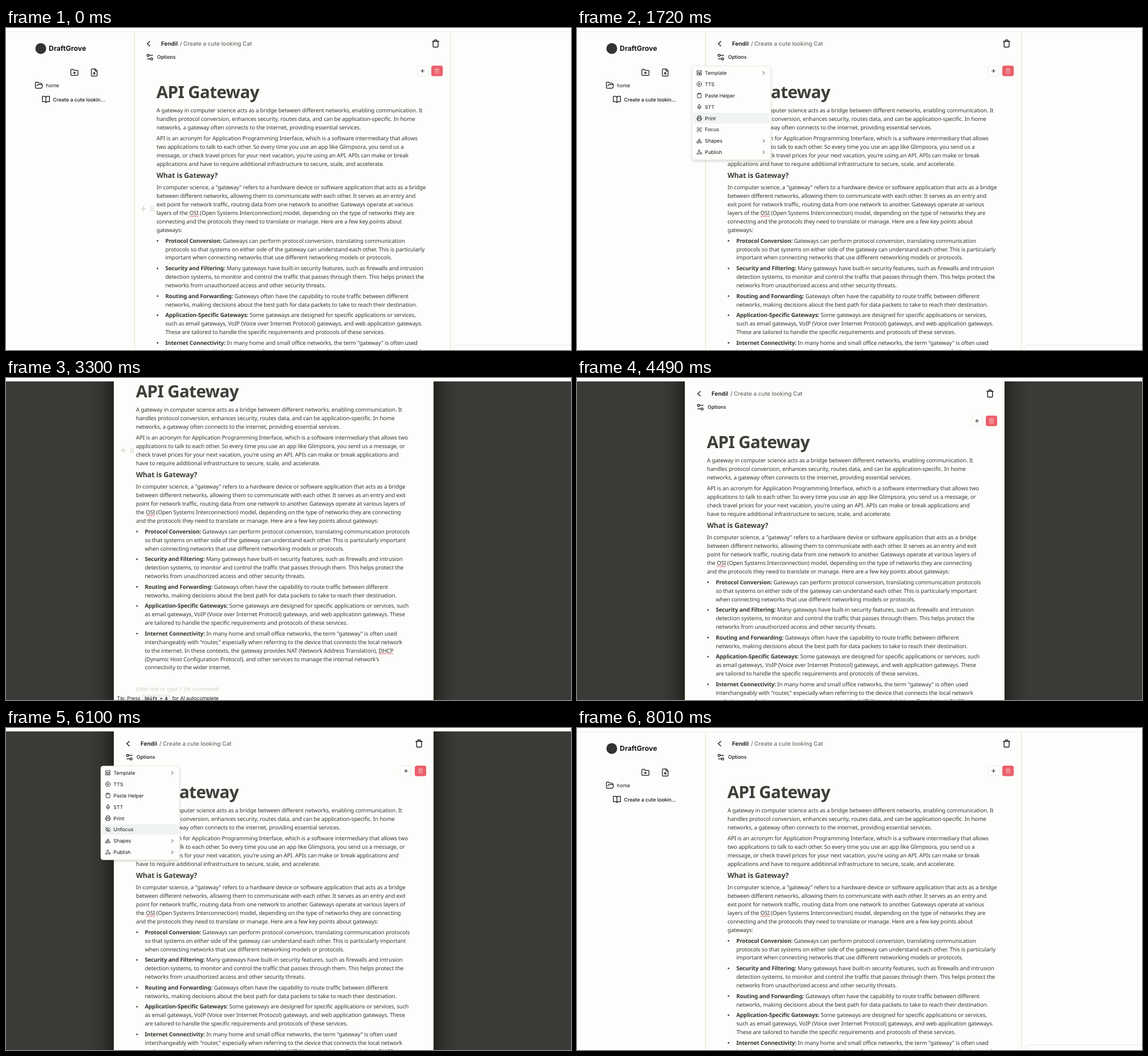
Write an HTML page that moves like this. It is 991 by 565 pixels and loops after 8370 ms.

```html
<!DOCTYPE html>
<html lang="en">
<head>
<meta charset="utf-8">
<title>Focus mode</title>
<style>
  html, body { margin: 0; width: 100%; height: 100%; overflow: hidden; background: #fdfdfb; }
  svg { display: block; }
  text { text-rendering: geometricPrecision; white-space: pre; }
  .ui { font: 400 8.75px Inter, sans-serif; fill: #151515; }
  .crumb { font: 500 10px Inter, sans-serif; fill: #6d6c69; }
  .body { font: 400 9.8px "Noto Sans", "Open Sans", sans-serif; letter-spacing: -.12px; fill: #363532; }
  .h1 { font: 700 29.6px "Noto Sans", "Open Sans", sans-serif; letter-spacing: -.65px; fill: #3f3e3b; }
  .h3 { font: 700 12.4px "Noto Sans", "Open Sans", sans-serif; letter-spacing: -.14px; fill: #3f3e3b; }
  .hint { font-style: italic; fill: #cfcfcb; }
  .key { font: 700 7.5px "DejaVu Sans Mono", monospace; fill: #222; }
</style>
</head>
<body>
<svg id="stage" width="991" height="565" viewBox="0 0 991 565">
  <defs>
    <clipPath id="below"><rect y="6" width="991" height="559"/></clipPath>
    <linearGradient id="shade">
      <stop offset="0" stop-color="#1d1d1a" stop-opacity="0"/>
      <stop offset=".55" stop-color="#1d1d1a" stop-opacity=".3"/>
      <stop offset="1" stop-color="#1d1d1a" stop-opacity=".85"/>
    </linearGradient>
    <filter id="soft" x="-10%" y="-10%" width="120%" height="125%">
      <feDropShadow dx="0" dy="2" stdDeviation="2" flood-opacity=".16"/>
    </filter>
  </defs>
</svg>
<script>
const LOOP = 8370, PAPER = '#fdfdfb', INK = '#151515', EDGE = '#e1e3c4';
const STEP = 14.9, GAP = 18.7;

const ICONS = {
  trash: 'M3 6h18M19 6v14c0 1-1 2-2 2H7c-1 0-2-1-2-2V6M8 6V4c0-1 1-2 2-2h4c1 0 2 1 2 2v2',
  bars: 'M10 11v6M14 11v6',
  plus: 'M5 12h14M12 5v14',
  left: 'M16 5l-8 7 8 7',
  right: 'M9 18l6-6-6-6',
  options: 'M20 7h-9M14 17H5M20 17a3 3 0 1 1-6 0a3 3 0 1 1 6 0M10 7a3 3 0 1 1-6 0a3 3 0 1 1 6 0',
  folderPlus: 'M12 10v6M9 13h6M20 20a2 2 0 0 0 2-2V8a2 2 0 0 0-2-2h-7.9a2 2 0 0 1-1.7-.9L9.6 3.9A2 2 0 0 0 7.9 3H4a2 2 0 0 0-2 2v13a2 2 0 0 0 2 2Z',
  fileUp: 'M15 2H6a2 2 0 0 0-2 2v16a2 2 0 0 0 2 2h12a2 2 0 0 0 2-2V7ZM14 2v4a2 2 0 0 0 2 2h4M12 12v6M15 15l-3-3-3 3',
  folder: 'M6 14l1.5-2.9A2 2 0 0 1 9.2 10H20a2 2 0 0 1 1.9 2.5l-1.5 6a2 2 0 0 1-2 1.5H4a2 2 0 0 1-2-2V5a2 2 0 0 1 2-2h3.9a2 2 0 0 1 1.7.9l.8 1.2a2 2 0 0 0 1.7.9H18a2 2 0 0 1 2 2v2',
  book: 'M2 3h6a4 4 0 0 1 4 4v14a3 3 0 0 0-3-3H2zM22 3h-6a4 4 0 0 0-4 4v14a3 3 0 0 1 3-3h7z',
  template: 'M3 3h18v7H3zM3 14h9v7H3zM16 14h5v7h-5z',
  play: 'M22 12a10 10 0 1 1-20 0a10 10 0 1 1 20 0M10 8l6 4-6 4z',
  paste: 'M8 2h8v4H8zM16 4h2a2 2 0 0 1 2 2v14a2 2 0 0 1-2 2H6a2 2 0 0 1-2-2V6a2 2 0 0 1 2-2h2',
  mic: 'M12 2a3 3 0 0 0-3 3v7a3 3 0 0 0 6 0V5a3 3 0 0 0-3-3ZM19 10v2a7 7 0 0 1-14 0v-2M12 19v3',
  print: 'M6 9V2h12v7M6 18H4a2 2 0 0 1-2-2v-5a2 2 0 0 1 2-2h16a2 2 0 0 1 2 2v5a2 2 0 0 1-2 2h-2M6 14h12v8H6z',
  focus: 'M3 7V5a2 2 0 0 1 2-2h2M17 3h2a2 2 0 0 1 2 2v2M21 17v2a2 2 0 0 1-2 2h-2M7 21H5a2 2 0 0 1-2-2v-2M5 12s2.5-5 7-5 7 5 7 5-2.5 5-7 5-7-5-7-5M13 12a1 1 0 1 1-2 0a1 1 0 1 1 2 0',
  unfocus: 'M2 2l20 20M9.9 5A10 10 0 0 1 12 5c7 0 10 7 10 7a13 13 0 0 1-1.7 2.7M6.6 6.6A13.5 13.5 0 0 0 2 12s3 7 10 7a9.7 9.7 0 0 0 5.4-1.6M9.9 9.9a3 3 0 1 0 4.2 4.2',
  shapes: 'M8 10l4-7 4 7ZM3 14h7v7H3zM21 17.5a3.5 3.5 0 1 1-7 0a3.5 3.5 0 1 1 7 0',
  publish: 'M18 17h-6c-1.1 0-2 .9-2.5 1.9A4 4 0 0 1 2 17c0-.7.2-1.4.6-2M6 17l3.1-5.8c.5-1 .1-2.2-.5-3.1a4 4 0 1 1 6.9-4M12 6l3.1 5.7C15.7 12.7 16.9 13 18 13a4 4 0 0 1 0 8'
};

// Line breaks: | in both layouts, ^ only beside the sidebar, ~ only in focus mode.
const INTRO = [
  'A gateway in computer science acts as a bridge between different networks, enabling communication. It|handles protocol conversion, enhances security, routes data, and can be application-specific. In home|networks, a gateway often connects to the internet, providing essential services.',
  "API is an acronym for Application Programming Interface, which is a software intermediary that allows^two~applications to talk to each other. So every time you use an app like Glimpsora, you send us a^message, or~check travel prices for your next vacation, you're using an API. APIs can make or break^applications and~have to require additional infrastructure to secure, scale, and accelerate."
];
const ABOUT = 'In computer science, a "gateway" refers to a hardware device or software application that acts as a bridge|between different networks, allowing them to communicate with each other. It serves as an entry and^exit~point for network traffic, routing data from one network to another. Gateways operate at various^layers of~the OSI (Open Systems Interconnection) model, depending on the type of networks they are^connecting~and the protocols they need to translate or manage. Here are a few key points about^gateways:';
const POINTS = [
  ['Protocol Conversion:', 'Gateways can perform protocol conversion, translating communication^protocols~so that systems on either side of the gateway can understand each other. This is particularly^important~when connecting networks that use different networking models or protocols.'],
  ['Security and Filtering:', 'Many gateways have built-in security features, such as firewalls and intrusion|detection systems, to monitor and control the traffic that passes through them. This helps protect the|networks from unauthorized access and other security threats.'],
  ['Routing and Forwarding:', 'Gateways often have the capability to route traffic between different|networks, making decisions about the best path for data packets to take to reach their destination.'],
  ['Application-Specific Gateways:', 'Some gateways are designed for specific applications or services,^such~as email gateways, VoIP (Voice over Internet Protocol) gateways, and web application gateways.^These~are tailored to handle the specific requirements and protocols of these services.'],
  ['Internet Connectivity:', 'In many home and small office networks, the term "gateway" is often used|interchangeably with "router," especially when referring to the device that connects the local network|to the internet. In these contexts, the gateway provides NAT (Network Address Translation), DHCP|(Dynamic Host Configuration Protocol), and other services to manage the internal network\'s|connectivity to the wider internet.']
];
const MISSPELT = /\b(OSI|DHCP)\b/;

const stage = document.getElementById('stage');

function add(parent, tag, attrs = {}, content) {
  const el = document.createElementNS('http://www.w3.org/2000/svg', tag);
  for (const k in attrs) el.setAttribute(k, attrs[k]);
  if (content) el.textContent = content;
  return parent.appendChild(el);
}
const group = (parent, attrs) => add(parent, 'g', attrs);
const rect = (parent, x, y, width, height, fill, more) => add(parent, 'rect', { x, y, width, height, fill, ...more });
const label = (parent, cls, x, y, str, style = '') => add(parent, 'text', { class: cls, x, y, style }, str);

function icon(parent, path, cx, cy, size = 15, stroke = INK, weight = 2) {
  const s = size / 24;
  return add(parent, 'path', {
    d: path, fill: 'none', stroke, 'stroke-width': weight, 'stroke-linecap': 'round', 'stroke-linejoin': 'round',
    transform: `translate(${cx - size / 2} ${cy - size / 2}) scale(${s})`
  });
}

// Zigzag under a misspelt word, placed from the laid-out text.
function squiggle(parent, text, y) {
  const hit = text.textContent.match(MISSPELT);
  if (!hit) return;
  const x0 = text.getStartPositionOfChar(hit.index).x;
  const x1 = text.getEndPositionOfChar(hit.index + hit[0].length - 1).x;
  let d = `M${x0} ${y}`;
  for (let x = x0 + 2, up = true; x <= x1; x += 2, up = !up) d += `L${x} ${up ? y + 2 : y}`;
  add(parent, 'path', { d, fill: 'none', stroke: '#d8434a', 'stroke-width': .9 });
}

function drawSidebar(parent) {
  add(parent, 'circle', { cx: 61, cy: 36, r: 9.5, fill: '#333331' });
  label(parent, 'ui', 75, 40.3, 'DraftGrove', 'font-size:12.3px;font-weight:700');
  icon(parent, ICONS.folderPlus, 120, 78);
  icon(parent, ICONS.fileUp, 154.7, 78);
  icon(parent, ICONS.folder, 57.8, 100.5);
  label(parent, 'ui', 70, 103.7, 'home');
  icon(parent, ICONS.book, 70, 125.5);
  label(parent, 'ui', 82.5, 128.6, 'Create a cute lookin...', 'font-weight:500');
  rect(parent, 784.5, 556.5, 220, 30, 'none', { rx: 5, stroke: '#e6e8ef' });
}

function drawColumn(parent, x0, x1) {
  rect(parent, x0, 7, x1 - x0, 558, PAPER);
  rect(parent, x0, 6, 1, 559, EDGE);
  rect(parent, x1 - 1, 6, 1, 559, EDGE);
}

function drawHeader(parent, x, right) {
  icon(parent, ICONS.left, x - 14, 27.5, 14, INK, 2.2);
  label(parent, 'crumb', x + 8, 30.9, 'Fendil', 'font-weight:600;fill:#151515');
  label(parent, 'crumb', x + 41, 30.9, '/');
  label(parent, 'crumb', x + 47, 30.9, 'Create a cute looking Cat');
  icon(parent, ICONS.options, x - 11.7, 51);
  label(parent, 'ui', x + 1, 54, 'Options', 'font-weight:500');
  icon(parent, ICONS.trash, right, 27.3, 15, INK, 2.2);
  rect(parent, right - 32.7, 66.5, 19.5, 17.5, '#fefefd', { rx: 3.5, stroke: '#ebebe8' });
  icon(parent, ICONS.plus, right - 23, 75.3, 10, INK, 2.2);
  rect(parent, right - 7.5, 66, 20, 18.5, '#ea606b', { rx: 3.5 });
  icon(parent, ICONS.trash + ICONS.bars, right + 2.6, 75.2, 10, '#f8c9cc', 2);
}

function drawPage(parent, x, right, focused) {
  const split = s => s.replace(focused ? /\^/g : /~/g, ' ').split(/[|^~]/);
  let y = 145;
  const paragraph = (str, left, bold) => {
    split(str).forEach((line, i) => {
      const t = add(parent, 'text', { class: 'body', x: left, y: y + 3.4 });
      if (bold && !i) {
        add(t, 'tspan', { 'font-weight': 700 }, bold);
        line = ' ' + line;
      }
      add(t, 'tspan', {}, line);
      squiggle(parent, t, y + 4.6);
      y += STEP;
    });
    y += GAP - STEP;
  };

  drawHeader(parent, x, right);
  label(parent, 'h1', x - .3, 122.6, 'API Gateway');
  INTRO.forEach(p => paragraph(p, x));
  label(parent, 'h3', x, 263.3, 'What is Gateway?');
  y = 280;
  paragraph(ABOUT, x);
  for (const [title, str] of POINTS) {
    add(parent, 'circle', { cx: x + 1.8, cy: y + .2, r: 1.4, fill: '#3f3e3b' });
    paragraph(str, x + 15.4, title);
  }
  if (!focused) return;
  label(parent, 'body hint', x, 638, "Enter text or type '/' for commands");
  label(parent, 'ui', 194.5, 654.3, 'Tip: Press');
  rect(parent, 238, 644, 51, 14, '#f0f0ed', { rx: 3 });
  label(parent, 'key', 243, 654.4, 'Shift + A');
  label(parent, 'ui', 291.5, 654.3, 'for AI autocomplete');
}

function drawHandle(parent, x) {
  const g = group(parent);
  add(g, 'path', { d: `M${x - 27.6} 0h9.4M${x - 22.9} -4.7v9.4`, stroke: '#c9c9c5', 'stroke-width': 1.2 });
  for (let i = 0; i < 6; i++)
    add(g, 'circle', { cx: x - 9.6 + (i % 2) * 3.7, cy: (Math.floor(i / 2) - 1) * 3.4, r: 1.05, fill: '#c4c4c0' });
  return g;
}

const ROW = 19.9, rowY = i => 78.7 + i * ROW;
function drawMenu(parent, toggle) {
  const g = group(parent);
  rect(g, 202, 66.8, 138, 164.4, PAPER, { rx: 4, stroke: '#e4e4e1', 'stroke-width': .8, filter: 'url(#soft)' });
  const mark = rect(g, 204.5, 0, 133, 18.6, '#eff4f2', { rx: 2.5 });
  ['Template', 'TTS', 'Paste Helper', 'STT', 'Print', toggle, 'Shapes', 'Publish'].forEach((name, i) => {
    const art = ['template', 'play', 'paste', 'mic', 'print', toggle.toLowerCase(), 'shapes', 'publish'][i];
    icon(g, ICONS[art], 214.5, rowY(i), 10);
    label(g, 'ui', 224.3, rowY(i) + 3.2, name);
    if (!i || i > 5) icon(g, ICONS.right, 327.5, rowY(i), 10);
  });
  return { g, mark };
}

const base = group(stage);
rect(base, 0, 0, 991, 565, PAPER);
rect(base, 0, 6, 991, 1, '#efefec');
drawSidebar(base);

const dark = group(stage);
rect(dark, 0, 6, 991, 559, '#3b3a37');
rect(dark, 148, 6, 42, 559, 'url(#shade)');
rect(dark, 0, 6, 42, 559, 'url(#shade)', { transform: 'translate(791 0) scale(-1 1)' });

const plain = group(stage);
drawColumn(plain, 225, 780);
drawPage(plain, 264, 753.5, false);
const plainHandle = drawHandle(plain, 264);

const zen = group(stage, { 'clip-path': 'url(#below)' });
rect(zen, 189, 6, 561, 1, PAPER);
drawColumn(zen, 189, 750);
const scroller = group(zen);
drawPage(scroller, 228, 724.5, true);
const zenHandle = drawHandle(scroller, 228.5);

rect(stage, 0, 0, 991, 6, '#fefefd');

const menus = [
  { ...drawMenu(stage, 'Focus'), dx: 0, open: 1150, close: 2100, hover: [[1330, 0], [1420, 1], [1520, 2], [1620, 3], [1700, 4], [1800, 5]] },
  { ...drawMenu(stage, 'Unfocus'), dx: -35.7, open: 4880, close: 6220, hover: [[5320, 0], [5420, 1], [5520, 2], [5630, 3], [5730, 4], [5850, 5]] }
];

// Centres of the blocks the drag handle can sit on.
const TITLE = 112, FIRST = 160, SECOND = 216, SUB = 259, MAIN = 317, NONE = null;
const HANDLE = [[0, MAIN], [520, SUB], [620, SECOND], [740, FIRST], [860, TITLE], [980, NONE],
  [2660, SECOND], [3660, FIRST], [3760, TITLE], [4260, NONE], [6600, FIRST], [6850, TITLE], [7050, NONE]];
const SCROLL = [[0, 0], [2870, 28], [2940, 66], [3000, 98], [3070, 107], [3300, 89], [3330, 38], [3370, 0]];
const FOCUS = [2100, 6220], FADE = 420;

const clamp = v => Math.min(1, Math.max(0, v));
const ease = v => 1 - (1 - clamp(v)) ** 2;
const at = (steps, t, none) => steps.reduce((v, [when, val]) => t >= when ? val : v, none);
const show = (el, on) => el.style.display = on ? '' : 'none';

function render(t) {
  const focused = t >= FOCUS[0] && t < FOCUS[1];
  dark.style.opacity = ease((t - FOCUS[0]) / FADE) - ease((t - FOCUS[1]) / FADE);
  show(plain, !focused);
  show(zen, focused);
  scroller.setAttribute('transform', `translate(0 ${-at(SCROLL, t, 0)})`);

  const y = at(HANDLE, t, NONE);
  for (const h of [plainHandle, zenHandle]) {
    show(h, y !== NONE);
    h.setAttribute('transform', `translate(0 ${y || 0})`);
  }

  for (const m of menus) {
    const k = ease((t - m.open) / 150) - ease((t - m.close) / 110);
    const s = .95 + .05 * k, row = at(m.hover, t, -1);
    show(m.g, k > 0);
    m.g.style.opacity = k;
    m.g.setAttribute('transform', `translate(${m.dx + 271 * (1 - s)} ${67 * (1 - s)}) scale(${s})`);
    show(m.mark, row >= 0);
    m.mark.setAttribute('y', rowY(row) - 9.3);
  }
}

const start = performance.now();
function tick() {
  render((performance.now() - start) % LOOP);
  requestAnimationFrame(tick);
}
tick();
</script>
</body>
</html>
```
